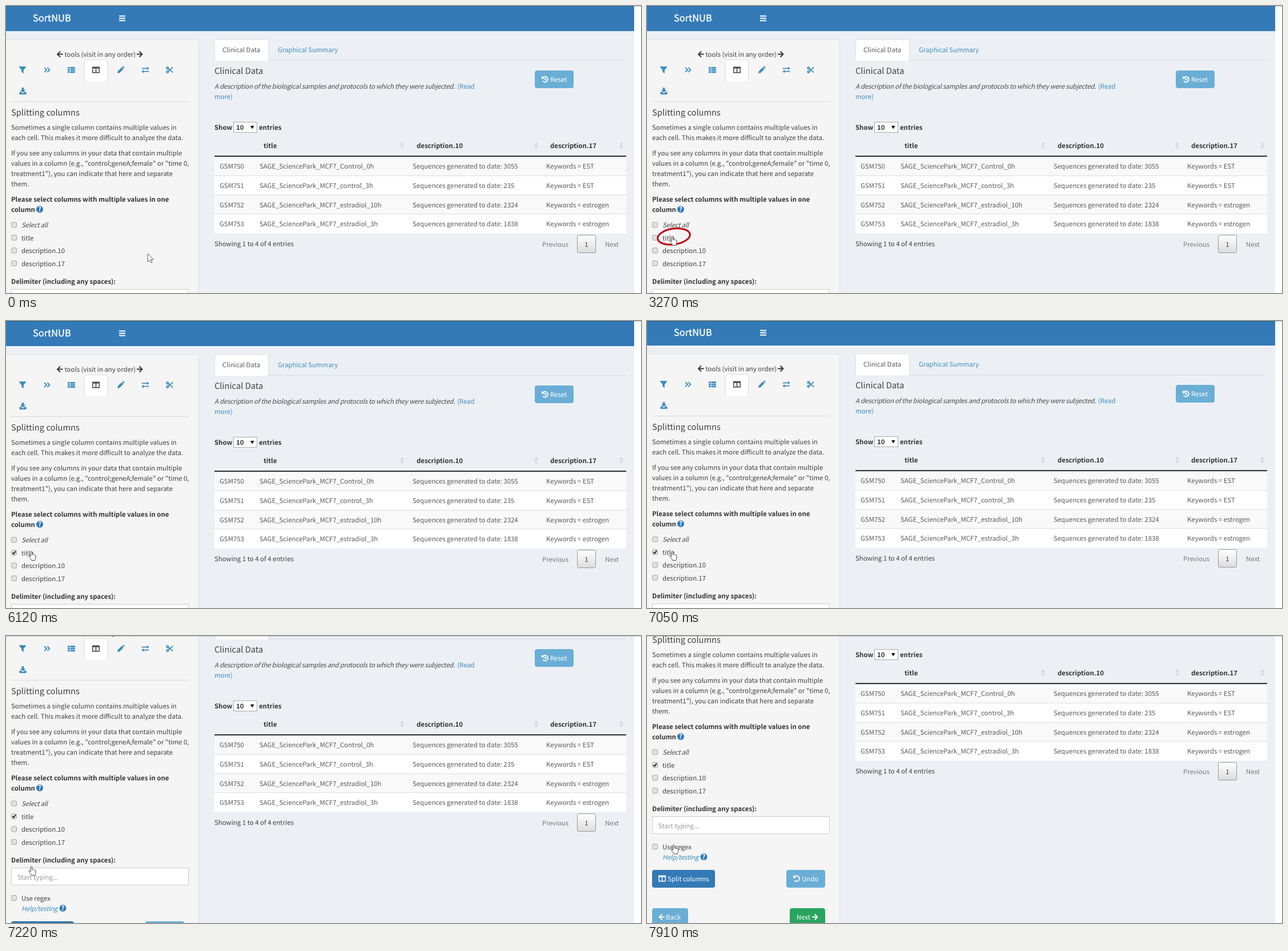
Recreate the animation shown at these times as an HTML page. Size 1112 by 503 pixels, loop 7.99 s.

```html
<!DOCTYPE html>
<html lang="en">
<head>
<meta charset="utf-8">
<title>Splitting columns</title>
<style>
  html, body { margin: 0; width: 100%; height: 100%; overflow: hidden; background: #fff; }
  svg { display: block; }
  text {
    font: 11.4px "Noto Sans CJK JP", "Noto Sans CJK SC", "Noto Sans CJK", Lato, sans-serif;
    fill: #404040; text-rendering: geometricPrecision;
  }
  .bold { font-weight: 700; fill: #333; }
  .italic { font-style: italic; letter-spacing: -.23px; fill: #4a4a4a; }
  .link { fill: #3c8dbc; }
  .cell { fill: #5a5a5a; }
  .muted { fill: #777; }
  .hint { fill: #999; }
  .white { fill: #fff; }
  .heading { font-size: 14.7px; }
  .brand { font-size: 16.4px; fill: #fff; stroke: #fff; stroke-width: .35; }
  .mid { text-anchor: middle; }
  .line { fill: none; stroke: currentColor; stroke-width: 1.8; }
</style>
</head>
<body>
<svg width="1112" height="503" viewBox="0 0 1112 503">
  <defs>
    <linearGradient id="shade" x2="0" y2="1">
      <stop stop-color="#fff"/><stop offset="1" stop-color="#dcdcdc"/>
    </linearGradient>
  </defs>
  <rect width="1100" height="503" fill="#ecf0f5"/>
  <g id="page"></g>
  <rect width="1112" height="1" fill="#000" opacity=".2"/>
  <ellipse id="mark" cx="47" cy="404" rx="28.5" ry="13.8" transform="rotate(-8 47 404)"
    fill="none" stroke="#c1000f" stroke-width="3"/>
  <g id="cursor" fill="#fff" stroke="#333" stroke-linejoin="round">
    <path id="arrow" d="M0 0V14.3L3.4 11.2 5.6 16 7.9 15 5.8 10.4H10Z" stroke-width=".8"/>
    <path id="hand" transform="translate(-5.3 0)" stroke-width=".9" d="M4 2c0-2 2.6-2 2.6 0v4.5c.5-.6 2-.6 2.3.4.6-.6 1.9-.4 2.1.5.8-.4 1.8 0 1.8 1v3.5c0 2-1 2.5-1.2 4.6h-6c-.2-1.6-3.6-4.6-4.6-6.6-.6-1.4 1-2 1.8-1L4 10z"/>
  </g>
</svg>
<script>
const $ = id => document.getElementById(id);
const BLUE = '#337ab7', SKY = '#3c8dbc', PALE = '#6aaed6', GREEN = '#28a55f';

const text = (x, y, s, cls = '') => `<text x="${x}" y="${y}" class="${cls}">${s}</text>`;
const rect = (x, y, w, h, fill, stroke = 'none', r = 0) =>
  `<rect x="${x}" y="${y}" width="${w}" height="${h}" rx="${r}" fill="${fill}" stroke="${stroke}"/>`;
const icon = (x, y, color, body) => `<g transform="translate(${x} ${y})" color="${color}" fill="${color}">${body}</g>`;
const line = d => `<path class="line" d="${d}"/>`;
const solid = d => `<path fill-rule="evenodd" d="${d}"/>`;
const tab = (x, y, w, h) =>
  `<path d="M${x} ${y + h}v${4 - h}q0-4 4-4h${w - 8}q4 0 4 4v${h - 4}" fill="#fff" stroke="#ddd"/>`;
const lines = (x, y, rows, cls) => rows.map((s, i) => text(x, y + i * 18.15, s, cls)).join('');
const checkbox = (y, id = '') => `<g ${id && `id="${id}"`}>${rect(9.5, y - 4.5, 9, 9, '#e2e2e2', '#a3a3a3', 2)}</g>`;
const button = (x, y, w, fill, stroke = fill) => rect(x + .5, y + .5, w - 1, 30, fill, stroke, 3);
const help = (x, y) => `<circle cx="${x}" cy="${y}" r="6" fill="${BLUE}"/>` +
  text(x, y + 4, '?', 'bold white mid');

// Icons are centred on their own origin.
const left = line('M5 0H-4M.5-5-4.5 0 .5 5');
const right = line('M-5 0H4M-.5-5 4.5 0-.5 5');
const columns = solid('M-6.5-5.5h13v11h-13zM-5-2.5v6.5h4.2v-6.5zM.8-2.5v6.5H5v-6.5z');
const undo = line('M-3.6-3.2A4.9 4.9 0 1 1-4 3') + solid('M-6-6v5.2h5.2z');
const tools = [
  [29, solid('M-6-6H6v1L1.8.3V6.3L-1.8 3.5V.3L-6-5z')],
  [72, line('M-4.8-4-.8 0-4.8 4M.4-4 4.4 0 .4 4')],
  [114.5, [-5, -1.3, 2.4].map(y => rect(-6.5, y, 3.6, 2.8, SKY) + rect(-2, y, 8.5, 2.8, SKY)).join('')],
  [157.5, columns],
  [201, solid('M-6 6-5.2 2.2 1.8-4.8 4.8-1.8-2.2 5.2zM2.6-5.6 3.6-6.4Q4.4-6.8 5-6.2L6.2-5Q6.8-4.2 6.2-3.4L5.6-2.6z')],
  [244, solid('M6.5-2.7 3-5.7v2.1H-6.3v1.8H3V.3zM-6.5 2.7-3-.3v2.1H6.3v1.8H-3v2.1z')],
  [286.5, line('M-2.4-2.2 5.8 4.6M-2.4 2.2 5.8-4.6') +
    '<g class="line"><circle cx="-3.6" cy="-3.4" r="1.7"/><circle cx="-3.6" cy="3.4" r="1.7"/></g>'],
];
const download = solid('M-1.8-6h3.6v4h3L0 2.8-4.8-2h3zM-6 1.6h3L0 4.4 3 1.6h3V6H-6z');

const header = rect(0, 0, 1100, 44, BLUE) + text(47, 27, 'SortNUB', 'brand') +
  [17, 21, 25].map(y => rect(198, y - .4, 11, 2, '#fff')).join('');

const sidebar = rect(-9.5, 58.5, 347, 800, '#f5f5f5', '#dfe1e4', 4) +
  icon(94.5, 84.5, '#333', left) + text(102.5, 88.5, 'tools (visit in any order)') + icon(234, 84.5, '#333', right) +
  tab(137.5, 94.5, 40, 37) +
  tools.map(([x, body]) => icon(x, 112, x === 157.5 ? '#444' : SKY, body)).join('') +
  icon(29.5, 149, SKY, download) + rect(9, 167, 311, 1, '#d8d8d8') +
  text(9, 192, 'Splitting columns', 'heading') +
  lines(9, 217, ['Sometimes a single column contains multiple values in',
    'each cell. This makes it more difficult to analyze the data.']) +
  lines(9, 262, ['If you see any columns in your data that contain multiple',
    'values in a column (e.g., "control;geneA;female" or "time 0,',
    'treatment1"), you can indicate that here and separate', 'them.']) +
  lines(9, 343, ['Please select columns with multiple values in one', 'column'], 'bold') + help(59, 356.3) +
  checkbox(383.5) + text(27, 388, 'Select all', 'italic') +
  checkbox(406, 'box') + text(27, 410.5, 'title') +
  `<path id="tick" d="M11.3 406.2l2 2.2 3.6-5" fill="none" stroke="#222" stroke-width="1.8"/>` +
  checkbox(428.5) + text(27, 433, 'description.10') +
  checkbox(451) + text(27, 455.5, 'description.17') +
  text(9, 487, 'Delimiter (including any spaces):', 'bold') +
  rect(9.5, 496.5, 310, 30, '#fff', '#ccc') + text(20, 516.5, 'Start typing...', 'hint') +
  checkbox(549) + text(27, 553.5, 'Use regex') +
  text(27, 571.5, 'Help/testing', 'italic link') + help(99.5, 567) +
  button(9, 590, 110, BLUE, '#2e6da4') + icon(26.5, 605, '#fff', columns) + text(36, 609.5, 'Split columns', 'white') +
  button(244, 590, 68, PALE) + icon(262, 605, '#fff', undo) + text(271, 609.5, 'Undo', 'white') +
  rect(9, 639, 311, 1, '#eaeaea') +
  button(9, 657, 63, PALE) + icon(26, 672.5, '#fff', left) + text(33, 677, 'Back', 'white') +
  button(250, 657, 62, GREEN) + text(262, 677, 'Next', 'white') + icon(294, 672.5, '#fff', right);

const sorter = x => `<path d="M${x - 3.5} 243.5h7l-3.5-5zM${x - 3.5} 245.5h7l-3.5 5z" fill="#d3d6da"/>`;
const samples = [['Control_0h', 3055, 'EST'], ['control_3h', 235, 'EST'],
  ['estradiol_10h', 2324, 'estrogen'], ['estradiol_3h', 1838, 'estrogen']];
const tableRow = ([name, count, keyword], i) => {
  const y = 264 + i * 33.6, base = y + 21.3;
  return rect(365, y, 721, 33.6, i % 2 ? '#fff' : '#f9f9f9') + (i ? rect(365, Math.round(y - .5), 721, 1, '#ddd') : '') +
    text(374, base, 'GSM' + (750 + i), 'cell') +
    text(444, base, 'SAGE_SciencePark_MCF7_' + name, 'cell') +
    text(712, base, 'Sequences generated to date: ' + count, 'cell') +
    text(946, base, 'Keywords = ' + keyword, 'cell');
};

const main = rect(365, 95, 721, 1, '#d8dbdf') + tab(365.5, 58.5, 94, 37.5) +
  text(379, 80.5, 'Clinical Data', 'cell') + text(476, 80.5, 'Graphical Summary', 'link') +
  text(365, 119, 'Clinical Data', 'heading') +
  text(365, 144.5, 'A description of the biological samples and protocols to which they were subjected.', 'italic') +
  text(790, 144.5, '(Read', 'link') + text(365, 162.5, 'more)', 'link') +
  button(926, 113, 68, PALE) +
  icon(944, 128.5, '#fff', undo + line('M.3-2.5V.8H2.5')) + text(953, 132.7, 'Reset', 'white') +
  text(365, 217.3, 'Show', 'bold') + rect(398.5, 203.5, 41, 18, '#fff', '#a9a9a9') +
  text(403, 217.3, '10', 'bold') + solid('M428 210h6.5l-3.25 5.5z') + text(443, 217.3, 'entries', 'bold') +
  text(451, 248.7, 'title', 'bold') + text(719, 248.7, 'description.10', 'bold') + text(953, 248.7, 'description.17', 'bold') +
  [693.5, 928.5, 1077.5].map(sorter).join('') +
  samples.map(tableRow).join('') + rect(365, 262.4, 721, 1.8, '#111') +
  text(365, 420.5, 'Showing 1 to 4 of 4 entries') + text(939, 421.5, 'Previous', 'muted') +
  rect(1000.5, 401.5, 32, 31, 'url(#shade)', '#979797', 2) + text(1016.5, 421.5, '1', 'mid') +
  text(1049, 421.5, 'Next', 'muted');

$('page').innerHTML = header + sidebar + main;

const DURATION = 7990;
// Start, end, number of held steps, target x and y, ease-out power.
const moves = [
  [410, 1180, 11, 94, 412, 1],
  [1250, 1490, 4, 51, 402, 1.6],
  [1660, 1890, 4, 44.5, 403, 1.6],
  [7760, 7910, 3, 47, 365.5, 1.3],
];
const scrolls = [[7050, 1], [7135, 48], [7220, 90], [7450, 91], [7525, 138], [7600, 180]];

function cursorAt(t) {
  let x = 248, y = 434;
  for (const [start, end, steps, toX, toY, power] of moves) {
    if (t < start) break;
    const step = Math.min(steps, 1 + Math.floor((t - start) / (end - start) * (steps - 1)));
    const k = 1 - (1 - step / steps) ** power;
    x += (toX - x) * k;
    y += (toY - y) * k;
  }
  return [x, y];
}

const show = (id, on) => $(id).setAttribute('visibility', on ? 'visible' : 'hidden');

function draw() {
  const t = performance.now() % DURATION;
  const scroll = scrolls.reduce((top, [at, value]) => t >= at ? value : top, 0);
  $('page').setAttribute('transform', `translate(0 ${-scroll})`);
  $('cursor').setAttribute('transform', `translate(${cursorAt(t)})`);
  show('arrow', t < 1660);
  show('hand', t >= 1660);
  show('mark', t >= 3270 && t < 4910);
  show('tick', t >= 5980);
  $('box').firstChild.setAttribute('fill', t >= 5890 && t < 6120 ? '#cfcfcf' : '#e2e2e2');
  requestAnimationFrame(draw);
}
draw();
</script>
</body>
</html>
```
